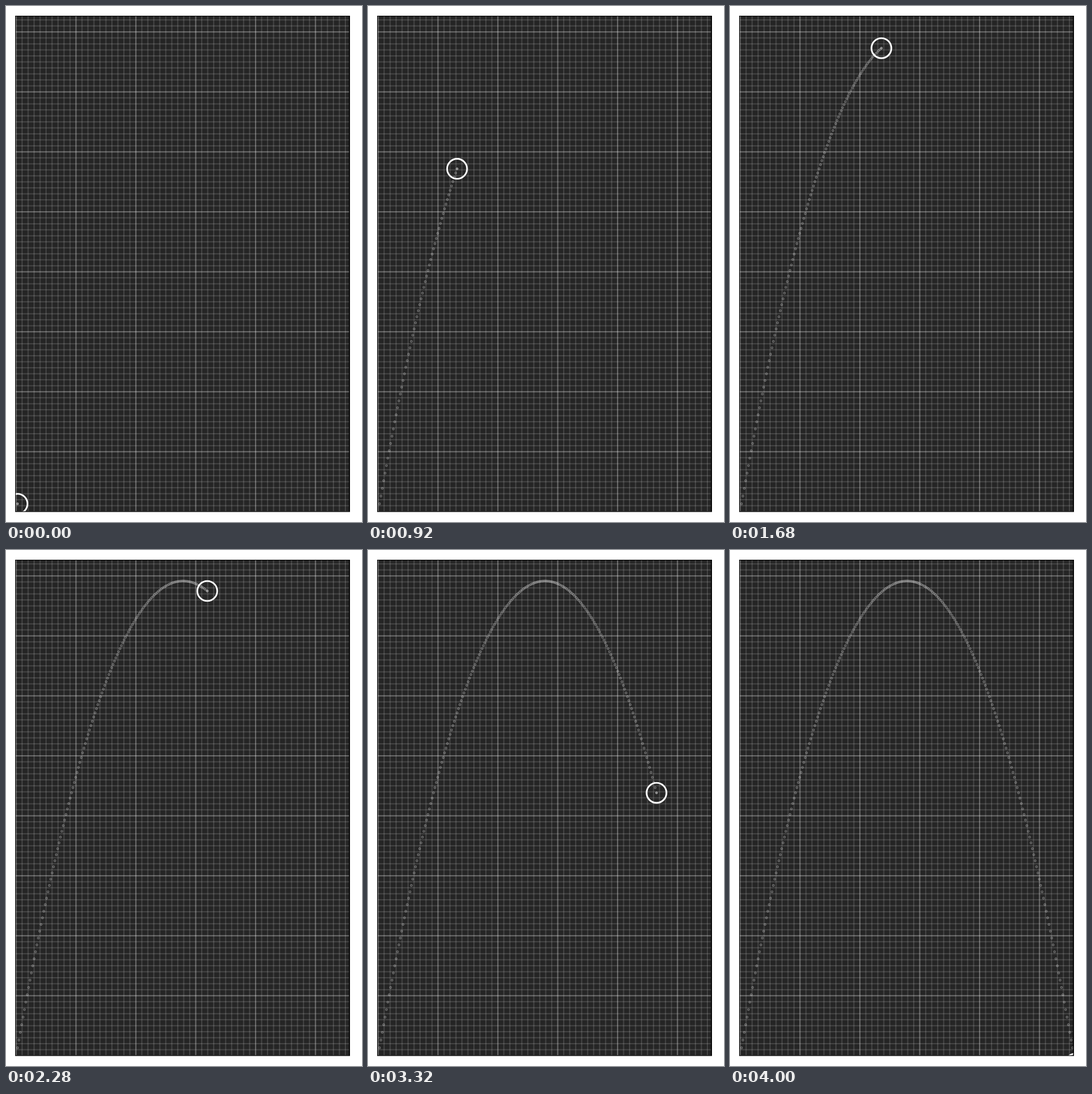
Recreate the animation shown at these times as an HTML page with a canvas. Size 622 by 900 pixels, loop 4.6 s.

```html
<!DOCTYPE html>
<html lang="en">
<head>
<meta charset="utf-8">
<title>Projectile path</title>
<style>
html, body { margin: 0; width: 100%; height: 100%; overflow: hidden; background: #fff; }
canvas { display: block; }
</style>
</head>
<body>
<canvas id="stage" width="622" height="900"></canvas>
<script>
const ctx = document.getElementById('stage').getContext('2d');
const LOOP = 4600, FRAME = 40, LAST = 100;
const box = { x: 17, y: 18, w: 582.5, h: 863.3 };
const origin = { x: 17.7, y: 882 };
const CELL = 10.46;

// Constant sideways speed, constant gravity; k counts 1/60 s steps.
const APEX = 120.5, GRAVITY = 0.05702, SPEED = 2.42;
const place = k => ({
  x: origin.x + SPEED * k,
  y: origin.y - GRAVITY * (APEX ** 2 - (k - APEX) ** 2)
});

function circle(p, r, width, color) {
  ctx.beginPath();
  ctx.arc(p.x, p.y, r, 0, 2 * Math.PI);
  ctx.lineWidth = width;
  ctx.strokeStyle = color;
  ctx.stroke();
}

function grid(gap, width, color) {
  ctx.fillStyle = color;
  for (let x = origin.x; x < box.x + box.w + 2; x += gap)
    ctx.fillRect(x - width / 2, box.y, width, box.h);
  for (let y = origin.y; y > box.y - 2; y -= gap)
    ctx.fillRect(box.x, y - width / 2, box.w, width);
}

function draw(time) {
  const n = Math.min(LAST, Math.floor((time % LOOP) / FRAME + 1e-6));
  const step = n ? Math.floor(n * 12 / 5) + 2 : 1;

  ctx.fillStyle = '#fff';
  ctx.fillRect(0, 0, 622, 900);
  ctx.fillStyle = '#000';
  ctx.fillRect(16, 17, 585, 865.5);

  ctx.save();
  ctx.beginPath();
  ctx.rect(box.x, box.y, box.w, box.h);
  ctx.clip();
  ctx.fillStyle = '#252525';
  ctx.fillRect(box.x, box.y, box.w, box.h);
  grid(CELL, 2.1, 'rgba(255,255,255,0.14)');
  grid(CELL * 10, 2.1, 'rgba(255,255,255,0.2)');

  for (let k = 1; k <= step; k++)
    circle(place(k), 1.6, 1.2, 'rgba(255,255,255,0.37)');

  const ball = place(step);
  circle(ball, 1.2, 1.8, 'rgba(255,255,255,0.35)');
  circle(ball, 17.4, 2.9, '#fff');
  ctx.restore();
}

const start = performance.now();
function tick() {
  draw(performance.now() - start);
  requestAnimationFrame(tick);
}
tick();
</script>
</body>
</html>
```
